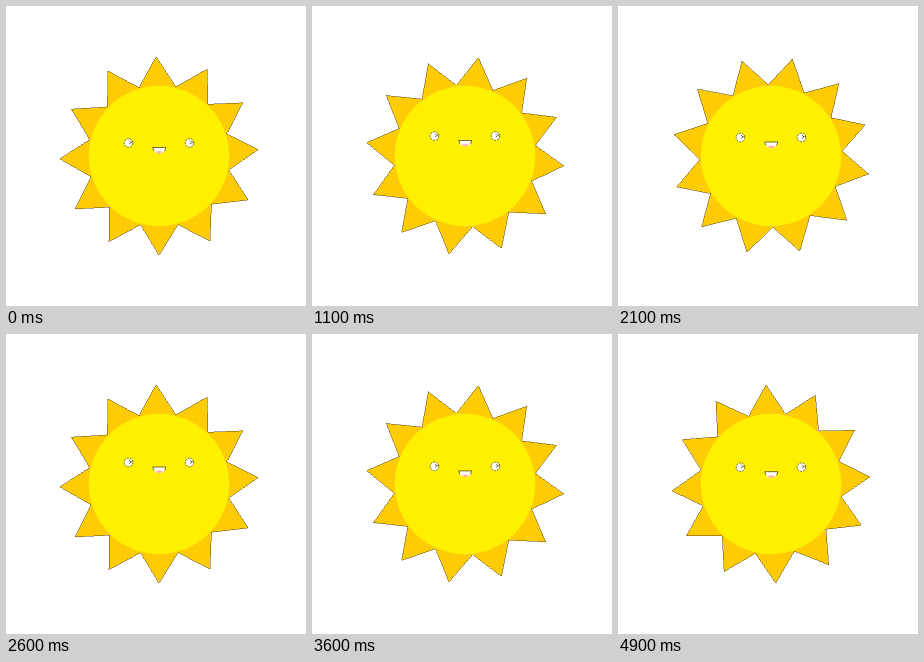
An HTML page for the animation above (5 s loop, 300 px wide and 300 px high).

```html
<!DOCTYPE html>
<html lang="en">
<head>
<meta charset="utf-8">
<title>Sun</title>
<style>
  html, body { margin: 0; width: 100%; height: 100%; overflow: hidden; background: #fff; }
  svg { display: block; width: 100vw; height: 100vh; }
</style>
</head>
<body>
<svg viewBox="0 0 300 300">
  <defs>
    <g id="eye" stroke="#3a3200" stroke-width=".7">
      <circle r="4.3" fill="#fff" stroke-dasharray="2 1"/>
      <path d="M.5-2.5L2.5-.5M2.5-.5L4-1.5M.5 1L2.5-.5" fill="none"/>
    </g>
  </defs>
  <path id="rays" fill="#ffcb05" stroke="#2a2000" stroke-width=".4" shape-rendering="crispEdges"/>
  <circle cx="153" cy="150" r="70.2" fill="#fff000"/>
  <g id="face">
    <use href="#eye" x="122.5"/>
    <use href="#eye" x="183.5"/>
    <path d="M146.7 4.5H159.8Q159 10.5 153.3 10.5T146.7 4.5Z" fill="#fff"/>
    <path d="M149.5 9Q153.3 7 157 9Q155.5 10.7 153.3 10.7T149.5 9Z" fill="#ffb3a6"/>
    <path d="M148 8L146.7 4.5H159.8L158.6 8" fill="none" stroke="#3a3200" stroke-width=".7"/>
  </g>
</svg>
<script>
  const LOOP = 5000, TICK = 100, POSES = 42, TURN = 4.7;
  const CX = 153, CY = 150, TIP = 99.3, BASE = 71.2;
  // small unevenness of each ray, in degrees
  const skew = [0, .7, -.7, -2, -2.1, .7, 1.6, 1.9, -.6, 0, -.2, .6];
  // face height in each pose of one bob
  const bob = [137, 133.7, 132.4, 131.5, 130.7, 130, 129.2, 128.5, 129.2, 130, 130.7, 131.4, 132.2, 133.2];

  const rays = document.getElementById('rays');
  const face = document.getElementById('face');

  const point = (deg, r) => {
    const a = deg * Math.PI / 180;
    return (CX + r * Math.sin(a)).toFixed(2) + ' ' + (CY - r * Math.cos(a)).toFixed(2);
  };
  const tipAngle = i => 30 * i - 1.65 + skew[i % 12];

  rays.setAttribute('d', 'M' + skew.flatMap((_, i) => [
    point(tipAngle(i), TIP),
    point((tipAngle(i) + tipAngle(i + 1)) / 2, BASE)
  ]).join('L') + 'Z');

  function draw(now) {
    const tick = Math.floor(now % LOOP / TICK);
    const pose = Math.floor(tick * POSES * TICK / LOOP);
    rays.setAttribute('transform', `rotate(${pose % 7 * TURN} ${CX} ${CY})`);
    face.setAttribute('transform', `translate(0 ${bob[pose % 14]})`);
  }

  const start = performance.now();
  function frame() {
    draw(performance.now() - start);
    requestAnimationFrame(frame);
  }
  draw(0);
  frame();
</script>
</body>
</html>
```
